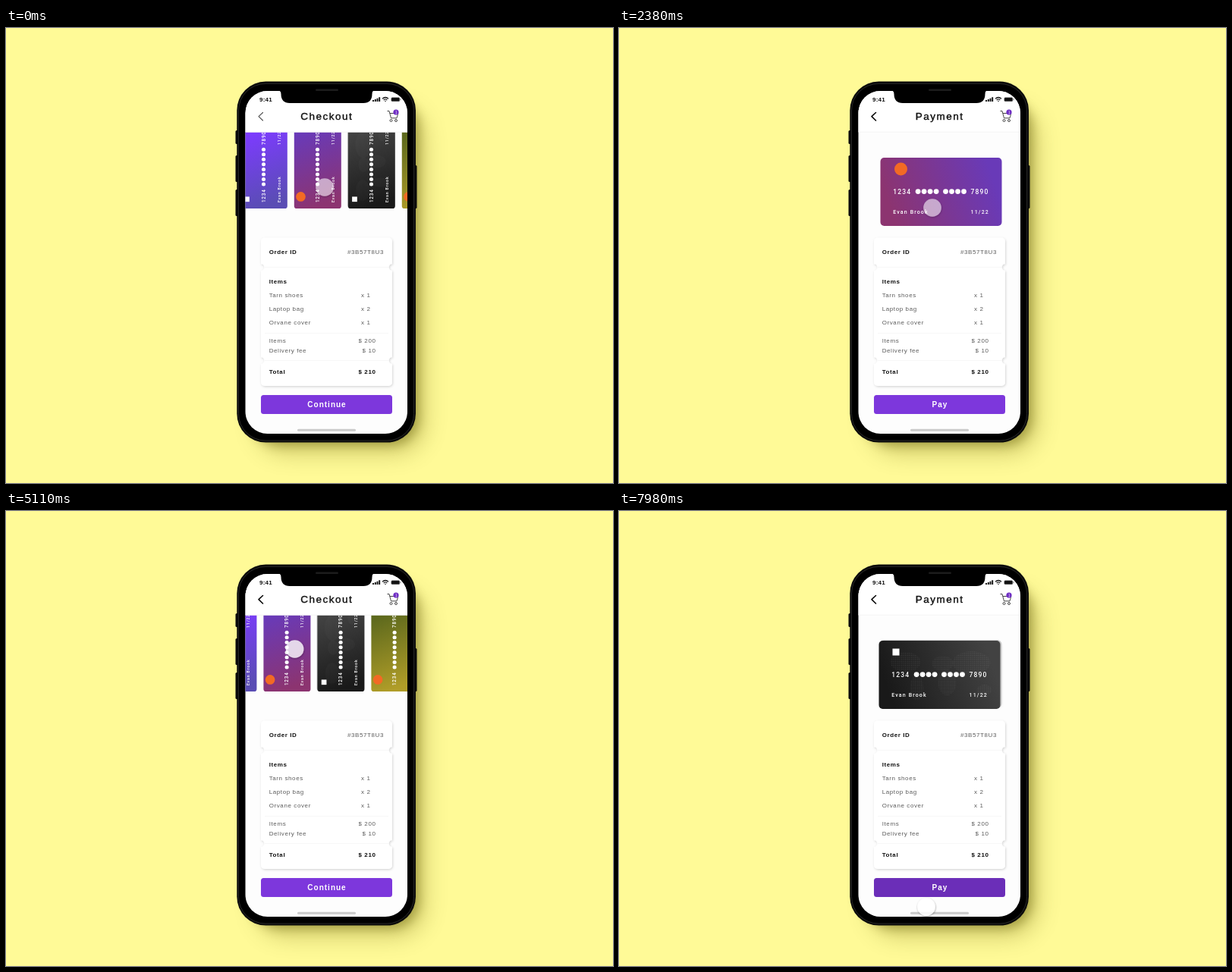
These frames come from a looping animation (800 by 600 pixels, 8000 ms). An HTML page:

```html
<!DOCTYPE html>
<html lang="en">
<head>
<meta charset="utf-8">
<title>Checkout flow</title>
<style>
  html, body { margin: 0; width: 100%; height: 100%; overflow: hidden; background: #fffa97; }
  svg { display: block; width: 800px; height: 600px; }
  text { font-family: "Liberation Sans", Arial, sans-serif; font-size: 8px; letter-spacing: .6px; fill: #5c5c5c; }
  .b { font-weight: 700; fill: #111; }
  .end { text-anchor: end; }
  .title { font-size: 13.5px; letter-spacing: 1.5px; text-anchor: middle; fill: #111; stroke: #111; stroke-width: .4px; }
  .btn { font-size: 10px; font-weight: 700; letter-spacing: 1px; text-anchor: middle; fill: #fff; }
  .card text { font-family: Roboto, Arial, sans-serif; font-weight: 500; fill: #fff; letter-spacing: 1.15px; font-size: 7px; }
  .card .num { font-size: 8.5px; }
</style>
</head>
<body>
<svg viewBox="0 0 800 600">
  <defs>
    <filter id="near" x="-30%" y="-30%" width="160%" height="160%"><feGaussianBlur stdDeviation="7"/></filter>
    <filter id="far" x="-30%" y="-30%" width="160%" height="160%"><feGaussianBlur stdDeviation="15"/></filter>
    <filter id="soft" x="-10%" y="-10%" width="120%" height="120%">
      <feDropShadow dx=".8" dy="1.2" stdDeviation="1.8" flood-opacity=".17"/>
    </filter>
    <filter id="touchShadow" x="-30%" y="-30%" width="160%" height="160%">
      <feDropShadow dx=".4" dy=".9" stdDeviation=".8" flood-opacity=".45"/>
    </filter>
    <pattern id="dots" width="2.6" height="2.6" patternUnits="userSpaceOnUse">
      <circle cx="1.3" cy="1.3" r=".75" fill="#fff"/>
    </pattern>
    <clipPath id="screen"><rect x="315.5" y="83" width="213.5" height="452" rx="29"/></clipPath>
    <clipPath id="body"><rect x="315" y="137.5" width="215" height="398"/></clipPath>
    <clipPath id="titleOut"><rect x="340" y="109" width="160"/></clipPath>
    <clipPath id="titleIn"><rect x="340" width="160"/></clipPath>
    <clipPath id="btnOut"><rect x="340" y="487" width="165"/></clipPath>
    <clipPath id="btnIn"><rect x="340" width="165"/></clipPath>
  </defs>

  <rect width="800" height="600" fill="#fffa97"/>
  <rect x="330" y="105" width="222" height="456" rx="38" fill="#5d5600" opacity=".28" filter="url(#far)"/>
  <rect x="322" y="92" width="223" height="459" rx="38" fill="#5d5600" opacity=".4" filter="url(#near)"/>
  <g fill="#0b0b0b">
    <rect x="302.500" y="135" width="5" height="18" rx="1.500"/>
    <rect x="302.500" y="168" width="5" height="35" rx="1.500"/>
    <rect x="302.500" y="213" width="5" height="35" rx="1.500"/>
    <rect x="537" y="181" width="4.500" height="57" rx="1.500"/>
    <rect x="304.300" y="70.600" width="235.700" height="476" rx="38"/>
  </g>
  <rect x="306.500" y="73.500" width="231" height="470.500" rx="35.500" fill="#000" stroke="#262626"/>

  <g clip-path="url(#screen)">
    <rect x="315" y="83" width="215" height="453" fill="#fdfdfd"/>

    <path fill="#fff" filter="url(#soft)" d="M341 276.500H504a5 5 0 0 1 5 5V311a4.500 4.500 0 0 0 0 9V434a4.500 4.500 0 0 0 0 9V467a5 5 0 0 1-5 5H341a5 5 0 0 1-5-5V443a4.500 4.500 0 0 0 0-9V320a4.500 4.500 0 0 0 0-9V281.500a5 5 0 0 1 5-5Z"/>
    <path stroke="#f7f7f7" d="M341 315.500H504M341 402.500H504M341 438.500H504"/>
    <g id="receipt"></g>

    <rect id="button" x="336" y="484" width="173" height="25" rx="3.500"/>
    <g clip-path="url(#btnOut)"><text class="btn" id="continue" x="423">Continue</text></g>
    <g clip-path="url(#btnIn)"><text class="btn" id="pay" x="423">Pay</text></g>
    <rect x="384" y="528.700" width="77" height="3" rx="1.500" fill="#cacaca"/>

    <g id="cards" clip-path="url(#body)"></g>

    <rect x="315" y="83" width="215" height="54" fill="#fff"/>
    <path d="M315 137.200H530" stroke="#f3f3f3" stroke-width=".8"/>
    <g clip-path="url(#titleOut)"><text class="title" id="checkout" x="422.700">Checkout</text></g>
    <g clip-path="url(#titleIn)"><text class="title" id="payment" x="422.700">Payment</text></g>
    <path id="back" d="M338.500 111.500L333 116.700L338.500 122" fill="none" stroke-linecap="round" stroke-linejoin="round"/>
    <g fill="none" stroke="#333" stroke-width=".9" stroke-linejoin="round">
      <path d="M502.500 109.500H505L507.500 118.800H515L516.800 112.500H506"/>
      <circle cx="507.500" cy="122" r="1.500"/><circle cx="514" cy="122" r="1.500"/>
    </g>
    <circle cx="514" cy="111" r="3.600" fill="#6f2dc4"/>
    <text x="513" y="112.800" style="font-size:4.500px;fill:#fff;letter-spacing:0">1</text>

    <text class="b" x="334" y="97" style="letter-spacing:.2px">9:41</text>
    <path d="M484 97V95M486.800 97V94M489.500 97V92.700M492.200 97V91.200" stroke="#111" stroke-width="1.900"/>
    <g fill="none" stroke="#111" stroke-width="1.200">
      <path d="M496 93.300Q500 89.700 504 93.300M497.700 95Q500 93 502.300 95"/>
      <path d="M499.300 96.500H500.700"/>
    </g>
    <rect x="507.800" y="91.700" width="11" height="5" rx="1.300" fill="#111" stroke="#777" stroke-width=".5"/>
    <path d="M520 93.300V95.200" stroke="#777"/>
    <path d="M357 82H487Q482.500 82 482.500 87Q482.500 99 471 99H374Q362.500 99 362.500 87Q362.500 82 357 82Z" fill="#000"/>
    <circle id="touch" r="11.800" fill="#fff" filter="url(#touchShadow)"/>
  </g>
  <rect x="408" y="80.500" width="30" height="2.500" rx="1.200" fill="#1c1c1c"/>
</svg>

<script>
const NS = "http://www.w3.org/2000/svg";
const $ = id => document.getElementById(id);
const LOOP = 8000, STEP = 70;

function add(parent, tag, attrs, label) {
  const node = document.createElementNS(NS, tag);
  for (const key in attrs) node.setAttribute(key, attrs[key]);
  if (label) node.textContent = label;
  parent.appendChild(node);
  return node;
}

const set = (id, key, value) => $(id).setAttribute(key, value);
const mix = (a, b, k) => a + (b - a) * k;
const linear = k => k;
const easeOut = k => 1 - (1 - k) ** 3;
const easeInOut = k => k * k * (3 - 2 * k);

// Keys are [time, value, ease into this key].
function track(t, keys) {
  if (t <= keys[0][0]) return keys[0][1];
  for (let i = 1; i < keys.length; i++) {
    const [t0, v0] = keys[i - 1], [t1, v1, ease = easeInOut] = keys[i];
    if (t < t1) return mix(v0, v1, ease((t - t0) / (t1 - t0)));
  }
  return keys[keys.length - 1][1];
}

// Receipt rows: baseline, label, value, value x, bold label, bold value
[
  [298.4, "Order ID", "#3B57T8U3", 498, 1, 0],
  [336.8, "Items", "", 0, 1, 0],
  [354.9, "Tarn shoes", "x 1", 480.5, 0, 0],
  [372.9, "Laptop bag", "x 2", 480.5, 0, 0],
  [390.9, "Orvane cover", "x 1", 480.5, 0, 0],
  [414.5, "Items", "$ 200", 487.5, 0, 0],
  [428.3, "Delivery fee", "$ 10", 487.5, 0, 0],
  [456.3, "Total", "$ 210", 487.5, 1, 1]
].forEach(([y, label, value, x, boldLabel, boldValue]) => {
  add($("receipt"), "text", { x: 346.7, y, class: boldLabel ? "b" : "" }, label);
  if (value) add($("receipt"), "text", { x, y, class: boldValue ? "b end" : "end" }, value);
});

function makeCard([left, right, roundLogo, map], i) {
  const g = add($("cards"), "g", { class: "card" });
  const grad = add(g, "linearGradient", { id: "card" + i, x1: 0, y1: .6, x2: 1, y2: .4 });
  add(grad, "stop", { offset: .05, "stop-color": left });
  add(grad, "stop", { offset: .95, "stop-color": right });
  if (map) add(g, "rect", { x: 1, y: -1, width: 161, height: 90, rx: 6, opacity: .2, filter: "url(#soft)" });
  add(g, "rect", { width: 160, height: 90, rx: 5, fill: `url(#card${i})` });
  if (map) {
    [[35, 28, 20, 13], [50, 62, 9, 17], [84, 30, 14, 10], [90, 55, 12, 17], [122, 29, 25, 15], [139, 65, 10, 7]]
      .forEach(([cx, cy, rx, ry]) => add(g, "ellipse", { cx, cy, rx, ry, fill: "url(#dots)", opacity: .09 }));
  }
  const face = add(g, "g", {});
  if (roundLogo) add(face, "circle", { cx: 27, cy: 15, r: 8.5, fill: "#f26a24" });
  else add(face, "rect", { x: 18, y: 10.5, width: 9, height: 9, fill: "#fff" });
  add(face, "text", { x: 16.7, y: 47.8, class: "num" }, "1234");
  add(face, "text", { x: 119, y: 47.8, class: "num" }, "7890");
  add(face, "text", { x: 16.7, y: 74.4 }, "Evan Brook");
  add(face, "text", { x: 119, y: 74.4 }, "11/22");
  const dots = Array.from({ length: 8 }, () => add(face, "circle", { cy: 44.6, r: 3.4, fill: "#fff" }));
  return { g, face, dots };
}

const cards = [
  ["#5a4db4", "#7d3bff", false, false],
  ["#8c3470", "#693ab8", true, false],
  ["#191919", "#424242", false, true],
  ["#b09d28", "#5d691d", true, false]
].map(makeCard);

// p runs from the small upright card (0) to the full horizontal one (1).
function placeCard({ g, face, dots }, x, y, p, opacity) {
  g.setAttribute("transform",
    `translate(${x} ${y}) rotate(${-90 - 270 * p}) scale(${mix(.689, 1, p)}) translate(-80 -45)`);
  g.setAttribute("opacity", opacity);
  face.setAttribute("transform", `translate(80 45) scale(${mix(1.08, 1, p)}) translate(-80 -45)`);
  dots.forEach((dot, n) =>
    dot.setAttribute("cx", 79.8 + (n - 3.5) * mix(8.8, 8, p) + (n > 3 ? 2.2 : -2.2) * p));
}

// The old label slides up and uncovers the new one rising below it.
function swapLabels(p, out, into, base, lift, cover, top, bottom) {
  set(out, "y", base - lift * p);
  set(into, "y", base + 8 * (1 - p));
  const outRect = document.querySelector(`#${top.id} rect`);
  const inRect = document.querySelector(`#${bottom.id} rect`);
  outRect.setAttribute("height", Math.max(0, cover - top.y));
  inRect.setAttribute("y", cover);
  inRect.setAttribute("height", Math.max(0, bottom.y - cover));
}

const openKeys = [
  [850, 0], [1050, .167, linear], [1250, .6, linear], [1950, 1, easeOut],
  [2450, 1], [2950, .5, easeInOut], [3350, 0, easeOut],
  [6500, 0], [7100, .6, k => k ** 1.4], [7750, 1, easeOut]
];
const scrollKeys = [[4530, 0], [4620, -3.5, linear], [5150, -41, easeInOut], [5600, -49.3, easeOut]];
const touchX = [
  [0, 420], [700, 414], [1050, 412], [2380, 413], [2950, 414], [3500, 416],
  [4400, 421.5], [4530, 421.5], [4620, 418, linear], [5150, 380], [5950, 425], [6500, 428], [7100, 420], [7450, 415], [7980, 405]
];
const touchY = [
  [0, 210], [650, 199], [850, 199], [1050, 178, linear], [1250, 122, linear], [1800, 122],
  [2380, 237], [2450, 237], [2950, 297], [3500, 174], [4400, 182], [5150, 182],
  [5950, 168], [6400, 188], [6500, 188], [7100, 117], [7400, 126], [7980, 522]
];
const touchAlpha = [
  [0, .57], [600, .57], [800, .8], [1250, .8], [1450, .57], [2380, .57], [2480, .8],
  [2950, .8], [3150, .55], [4400, .55], [4530, .8], [5150, .8], [5350, .55],
  [6350, .55], [6500, .8], [7100, .8], [7300, .57], [7750, .57], [7980, .85]
];

function draw(t) {
  const p = track(t, openKeys);
  const scroll = track(t, scrollKeys);
  const active = t < 4200 ? 1 : 2;
  const endX = active === 1 ? 424.5 : 422.5;

  cards.forEach((card, i) => {
    const x = 339.8 + i * 71 + scroll;
    if (i === active) placeCard(card, mix(x, endX, p), mix(183, 216, p), p, 1);
    else placeCard(card, x, 183 - 126 * p, 0, 1 - p);
  });
  const top = cards[active].g;
  if ($("cards").lastChild !== top) $("cards").appendChild(top);

  swapLabels(p, "checkout", "payment", 121.1, 14, 133 - 26 * p, { id: "titleOut", y: 109 }, { id: "titleIn", y: 136 });
  swapLabels(p, "continue", "pay", 500.3, 15, 509.5 - 22 * p, { id: "btnOut", y: 487 }, { id: "btnIn", y: 509 });

  const press = track(t, [[7750, 0], [7950, 1]]);
  set("button", "fill", `rgb(${mix(125, 107, press)},${mix(55, 46, press)},${mix(220, 184, press)})`);

  const ink = track(t, [[0, 80], [1050, 50], [1950, 10]]);
  set("back", "stroke", `rgb(${ink},${ink},${ink})`);
  set("back", "stroke-width", track(t, [[0, 1.1], [1950, 1.6]]));

  set("touch", "cx", track(t, touchX));
  set("touch", "cy", track(t, touchY));
  set("touch", "opacity", track(t, touchAlpha));
}

function tick() {
  const t = performance.now() % LOOP;
  draw(Math.floor(t / STEP) * STEP);
  requestAnimationFrame(tick);
}
tick();
</script>
</body>
</html>
```
